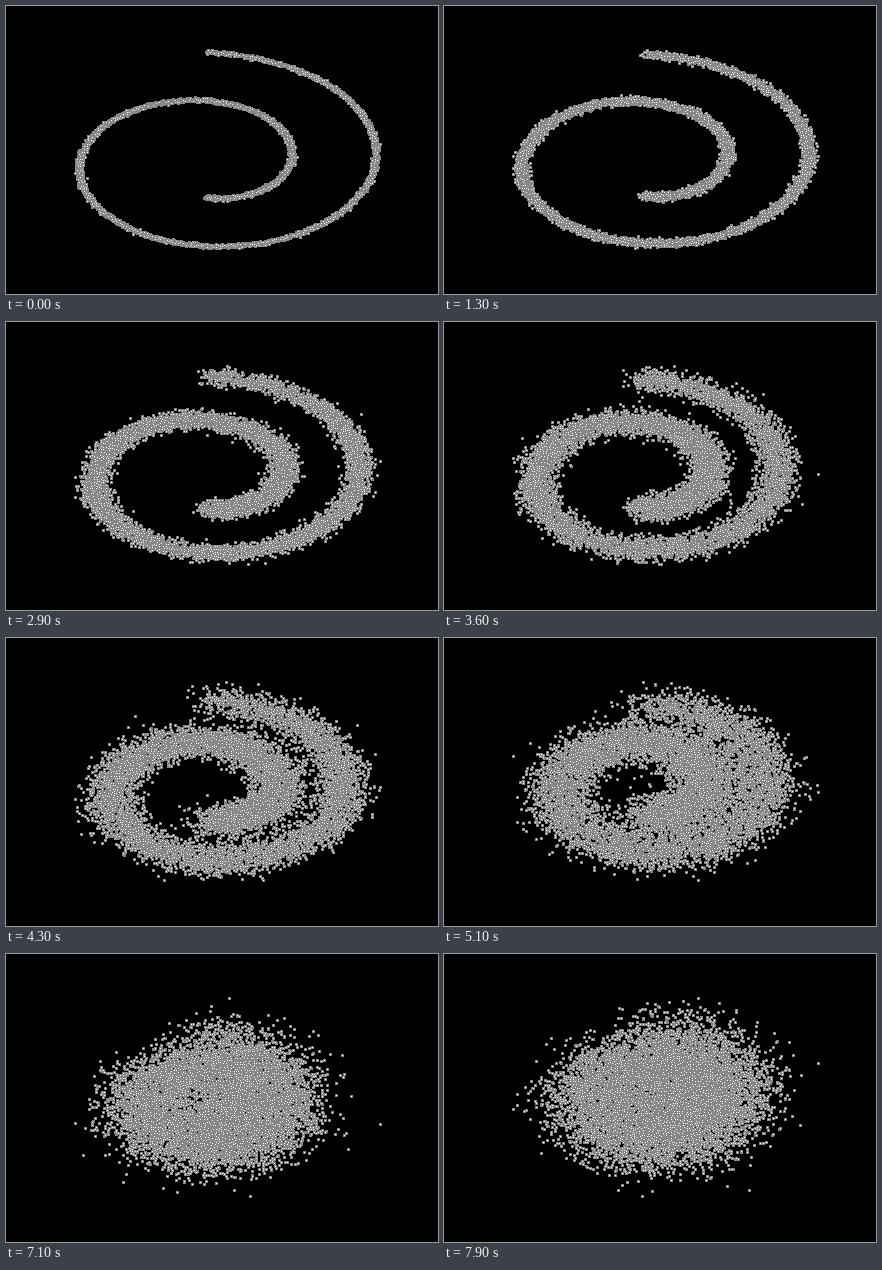
An HTML page with a canvas that plays this animation: 432x288 px, repeating every 8 s.

```html
<!DOCTYPE html>
<html lang="en">
<head>
<meta charset="utf-8">
<title>Swiss roll diffusion</title>
<style>
  html, body { margin: 0; width: 100%; height: 100%; overflow: hidden; background: #000; }
  canvas { display: block; width: 432px; height: 288px; image-rendering: pixelated; }
</style>
</head>
<body>
<canvas id="plot" width="432" height="288"></canvas>
<script>
const W = 432, H = 288, COUNT = 10000, LOOP = 8000, STEP_MS = 100, SCHEDULE = 100;
const AREA = { left: 69.22, right: 373.58, top: 44.44, bottom: 242.1 };
const EDGE = 0xff888888, FILL = 0xffffffff;

const ctx = document.getElementById('plot').getContext('2d');
const image = ctx.createImageData(W, H);
const pixels = new Uint32Array(image.data.buffer);

function randomFrom(seed) {
  let a = seed | 0;
  return () => {
    a = (a + 0x6d2b79f5) | 0;
    let r = Math.imul(a ^ (a >>> 15), a | 1);
    r ^= r + Math.imul(r ^ (r >>> 7), r | 61);
    return ((r ^ (r >>> 14)) >>> 0) / 4294967296;
  };
}

// Box-Muller: one independent pair of normal values per call.
function normalPair(random) {
  const radius = Math.sqrt(-2 * Math.log(1 - random()));
  const angle = 2 * Math.PI * random();
  return [radius * Math.cos(angle), radius * Math.sin(angle)];
}

const random = randomFrom(71);
const roll = Array.from({ length: COUNT }, () => {
  const t = 1.5 * Math.PI * (1 + 2 * random());
  const [nx, ny] = normalPair(random);
  return [(t * Math.cos(t) + 0.1 * nx) / 10, (t * Math.sin(t) + 0.1 * ny) / 10];
});

// Share of the signal left after each step of a sigmoid noise schedule.
const kept = [];
for (let i = 0, product = 1; i < SCHEDULE; i++) {
  const x = -6 + 12 * i / (SCHEDULE - 1);
  product *= 1 - (1e-5 + (0.005 - 1e-5) / (1 + Math.exp(-x)));
  kept.push(product);
}

function diffuse(step) {
  const noise = randomFrom(1000 + step * 7919);
  const signal = Math.sqrt(kept[step]), sigma = Math.sqrt(1 - kept[step]);
  return roll.map(([x, y]) => {
    const [nx, ny] = normalPair(noise);
    return [signal * x + sigma * nx, signal * y + sigma * ny];
  });
}

// Maps the data range of one axis onto a pixel range.
function fit(points, axis, from, to) {
  let min = Infinity, max = -Infinity;
  for (const p of points) {
    min = Math.min(min, p[axis]);
    max = Math.max(max, p[axis]);
  }
  return v => Math.round(from + (v - min) / (max - min) * (to - from));
}

function draw(step) {
  const points = diffuse(step);
  const toX = fit(points, 0, AREA.left, AREA.right);
  const toY = fit(points, 1, AREA.bottom, AREA.top);
  pixels.fill(0xff000000);
  for (const [x, y] of points) {
    const at = toY(y) * W + toX(x);
    for (let row = -W; row <= W; row += W) pixels.fill(EDGE, at + row - 1, at + row + 2);
    pixels[at] = FILL;
  }
  ctx.putImageData(image, 0, 0);
}

const start = performance.now();
let shown = -1;
function tick() {
  const time = Math.max(0, performance.now() - start) % LOOP;
  const step = Math.max(0, Math.floor(time / STEP_MS) - 1);
  if (step !== shown) draw(shown = step);
  requestAnimationFrame(tick);
}
tick();
</script>
</body>
</html>
```
